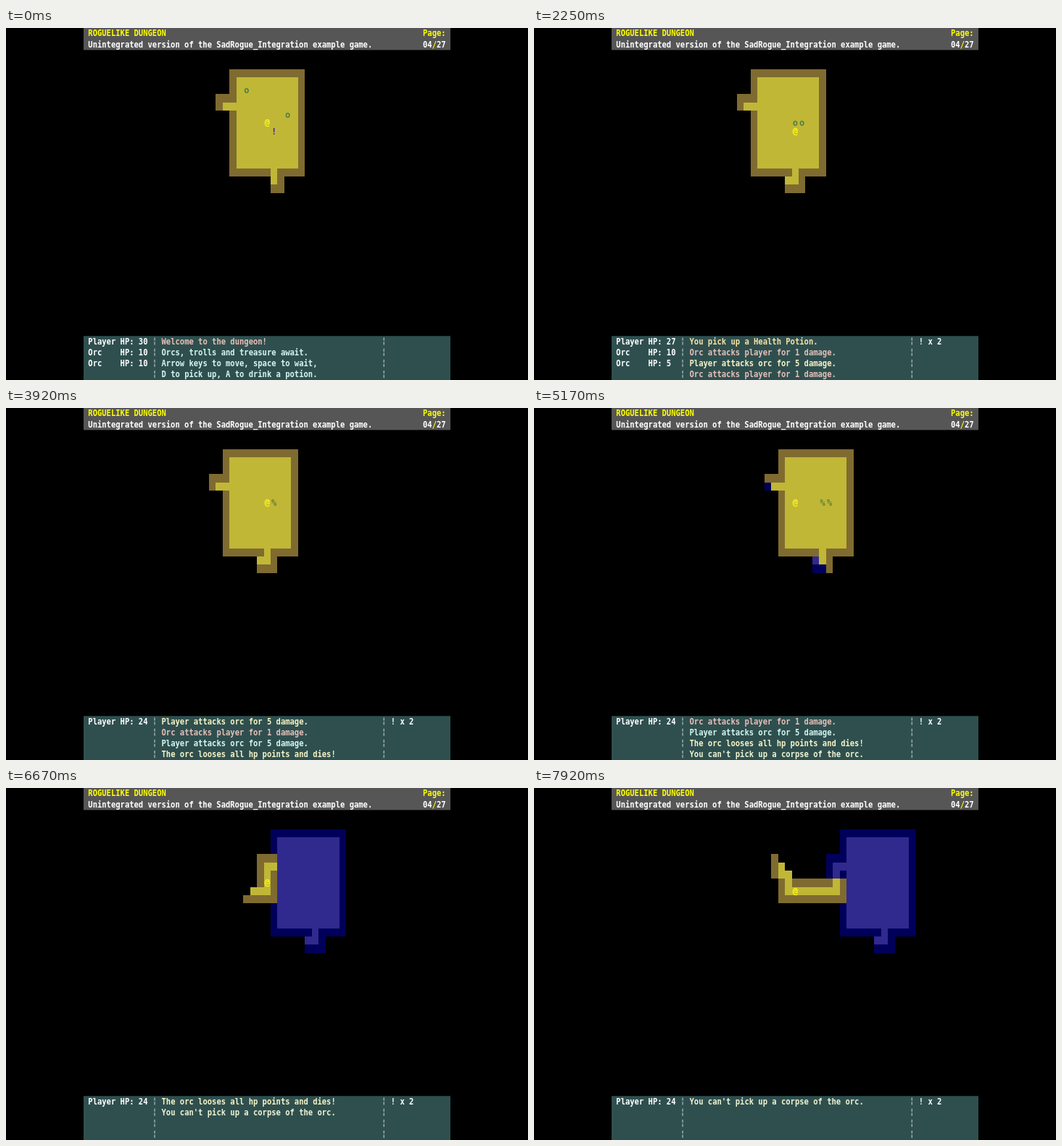
Recreate the animation shown at these times as an HTML page with a canvas. Size 720 by 486 pixels, loop 8000 ms.

```html
<!DOCTYPE html>
<html lang="en">
<head>
<meta charset="utf-8">
<title>Roguelike dungeon</title>
<style>
  html, body { margin: 0; width: 100%; height: 100%; overflow: hidden; background: #000; }
  canvas { display: block; }
</style>
</head>
<body>
<canvas id="stage" width="720" height="486"></canvas>
<script>
const LOOP = 8000, LEFT = 107, RADIUS = 8;
const CHAR_W = 506 / 80, CHAR_H = 486 / 32;
const CELL_W = CHAR_W * 1.5, CELL_H = CHAR_H * 0.75;
const PLAYER_X = 355.5, MAP_TOP = CELL_H * 5;
const PINK = '#e6bfb8', CYAN = '#d2f6f0', CREAM = '#f6f3c4', GOLD = '#f6e2a4', PALE = '#d3e2dd';
const ctx = document.getElementById('stage').getContext('2d');

// Floor areas as x0, y0, x1, y1, counted from the room's top left wall.
const areas = [
  [1, 1, 9, 11], [6, 12, 6, 13], [5, 13, 6, 13],
  [-1, 4, 0, 4], [-1, 4, -1, 7], [-8, 7, -1, 7], [-8, 5, -8, 7], [-9, 4, -9, 5]
];
const isFloor = (x, y) =>
  areas.some(([x0, y0, x1, y1]) => x >= x0 && x <= x1 && y >= y0 && y <= y1);
const key = (x, y) => x + ',' + y;

// Recursive shadow casting over eight octants.
function fieldOfView(px, py) {
  const lit = new Set([key(px, py)]);
  function cast(row, start, end, sx, sy, swap) {
    if (start < end) return;
    let blocked = false, nextStart = 0;
    for (let d = row; d <= RADIUS && !blocked; d++) {
      for (let o = d; o >= 0; o--) {
        const high = (o + 0.5) / (d - 0.5), low = (o - 0.5) / (d + 0.5);
        if (start < low) continue;
        if (end > high) break;
        const x = px + sx * (swap ? d : o), y = py + sy * (swap ? o : d);
        const open = isFloor(x, y);
        lit.add(key(x, y));
        if (blocked) {
          if (open) { blocked = false; start = nextStart; }
          else nextStart = low;
        } else if (!open && d < RADIUS) {
          blocked = true;
          cast(d + 1, start, high, sx, sy, swap);
          nextStart = low;
        }
      }
    }
  }
  for (const sx of [-1, 1])
    for (const sy of [-1, 1])
      for (const swap of [false, true]) cast(1, 1, 0, sx, sy, swap);
  return lit;
}

const turns = [];

function turn(time, change) {
  const s = structuredClone(turns.at(-1));
  s.time = time;
  change(s);
  look(s);
  turns.push(s);
}

function look(s) {
  s.lit = fieldOfView(s.x, s.y);
  s.lit.forEach(k => s.seen.add(k));
}

function say(s, text, color) {
  const last = s.log.at(-1);
  if (last && last.text === text) last.repeats++;
  else s.log.push({ text, color, repeats: 0 });
  s.log = s.log.slice(-4);
}

function hurt(s) {
  s.hp--;
  say(s, 'Orc attacks player for 1 damage.', PINK);
}

function strike(s, orc, color) {
  s.orcs[orc].hp -= 5;
  say(s, 'Player attacks orc for 5 damage.', color);
}

function place(thing, x, y) { thing.x = x; thing.y = y; }

function walk(time, pace, route) {
  [...route].forEach((way, i) => turn(time + i * pace, s => {
    s.x += (way === 'R') - (way === 'L');
    s.y += (way === 'D') - (way === 'U');
  }));
}

const opening = {
  time: 0, x: 5, y: 6, hp: 30, potions: 0, seen: new Set(), log: [],
  orcs: [{ x: 2, y: 2, hp: 10 }, { x: 8, y: 5, hp: 10 }]
};
say(opening, 'Welcome to the dungeon!', PINK);
say(opening, 'Orcs, trolls and treasure await.', CYAN);
say(opening, 'Arrow keys to move, space to wait,', CYAN);
say(opening, 'D to pick up, A to drink a potion.', CYAN);
look(opening);
turns.push(opening);

turn(400, s => { s.y++; place(s.orcs[0], 3, 3); place(s.orcs[1], 7, 6); });
turn(800, s => { s.x++; place(s.orcs[0], 4, 4); hurt(s); });
turn(1200, s => { s.potions = 2; say(s, 'You pick up a Health Potion.', GOLD); });
turn(1650, s => { place(s.orcs[0], 5, 5); hurt(s); });
turn(1950, s => { strike(s, 1, CREAM); place(s.orcs[0], 6, 6); hurt(s); });
turn(2300, s => {
  strike(s, 1, CYAN);
  say(s, 'The orc receives a mortal wound and dies!', PALE);
  hurt(s);
});
turn(2650, s => { place(s, 7, 6); hurt(s); });
turn(3000, s => { strike(s, 0, CREAM); hurt(s); });
turn(3420, s => {
  strike(s, 0, CYAN);
  say(s, 'The orc looses all hp points and dies!', CREAM);
});
walk(3750, 0, 'L');
turn(4250, s => say(s, "You can't pick up a corpse of the orc.", '#eef3d2'));
walk(4420, 200, 'LLLL');
walk(5250, 200, 'LUULLDD');
walk(6710, 180, 'DLLLLLL');

// Old messages fade from the log, one at a time.
const expiry = [5500, 6340, 7200];

function rect(x0, y0, x1, y1, color) {
  ctx.fillStyle = color;
  ctx.fillRect(x0, y0, x1 - x0, y1 - y0);
}

function print(col, row, text, color = '#fff') {
  ctx.save();
  ctx.translate(LEFT + col * CHAR_W, row * CHAR_H + 11.4);
  ctx.scale(1, 1.24);
  ctx.font = 'bold 10.5px "DejaVu Sans Mono", monospace';
  ctx.textAlign = 'left';
  ctx.fillStyle = color;
  ctx.fillText(text, 0, 0);
  ctx.restore();
}

function drawMap(s) {
  const left = x => PLAYER_X + (x - s.x) * CELL_W;
  const top = y => MAP_TOP + y * CELL_H;
  for (const k of s.seen) {
    const [x, y] = k.split(',').map(Number);
    const [floor, wall] = s.lit.has(k) ? ['#c1b736', '#7f6b30'] : ['#30298e', '#00005a'];
    rect(Math.round(left(x)), Math.round(top(y)),
      Math.round(left(x + 1)), Math.round(top(y + 1)), isFloor(x, y) ? floor : wall);
  }
  const glyph = (x, y, char, color, base = 10) => {
    if (!s.lit.has(key(x, y))) return;
    ctx.font = 'bold 12px "DejaVu Sans Mono", monospace';
    ctx.textAlign = 'center';
    ctx.fillStyle = color;
    ctx.fillText(char, left(x + 0.5), top(y) + base);
  };
  if (!s.potions && !(s.x === 6 && s.y === 7)) glyph(6, 7, '!', '#4b18c4');
  for (const orc of s.orcs) {
    if (orc.hp > 0) glyph(orc.x, orc.y, 'o', '#4a8045');
    else if (orc.x !== s.x || orc.y !== s.y) glyph(orc.x, orc.y, '%', '#5c803c');
  }
  glyph(s.x, s.y, '@', '#ffff10', 9);
}

function drawPanels(s, time) {
  const right = LEFT + 506, bottom = CHAR_H * 28;
  rect(LEFT, 0, right, CHAR_H * 2, '#565656');
  print(1, 0, 'ROGUELIKE DUNGEON', '#ff0');
  print(1, 1, 'Unintegrated version of the SadRogue_Integration example game.');
  print(74, 0, 'Page:', '#ff0');
  print(74, 1, '04');
  print(76, 1, '/', '#ff0');
  print(77, 1, '27');

  rect(LEFT, bottom, right, 486, '#2f4f4f');
  for (let row = 28; row < 32; row++)
    for (const col of [15, 65]) {
      const x = LEFT + (col + 0.5) * CHAR_W, y = row * CHAR_H;
      rect(x - 0.7, y + 2.2, x + 0.7, y + 6.4, '#a3b0b0');
      rect(x - 0.7, y + 8, x + 0.7, y + 12.2, '#a3b0b0');
    }
  const fighters = [['Player', s.hp]];
  s.orcs.forEach(orc => { if (orc.hp > 0) fighters.push(['Orc', orc.hp]); });
  fighters.forEach(([name, hp], i) => print(1, 28 + i, name.padEnd(7) + 'HP: ' + hp));
  s.log.slice(expiry.filter(t => t <= time).length).forEach(({ text, color, repeats }, i) =>
    print(17, 28 + i, text + (repeats ? ' x ' + repeats : ''), color));
  if (s.potions) print(67, 28, '! x ' + s.potions);
}

const began = performance.now();

function draw() {
  const time = (performance.now() - began) % LOOP;
  const state = turns.findLast(s => s.time <= time);
  rect(0, 0, 720, 486, '#000');
  drawMap(state);
  drawPanels(state, time);
  requestAnimationFrame(draw);
}
draw();
</script>
</body>
</html>
```
